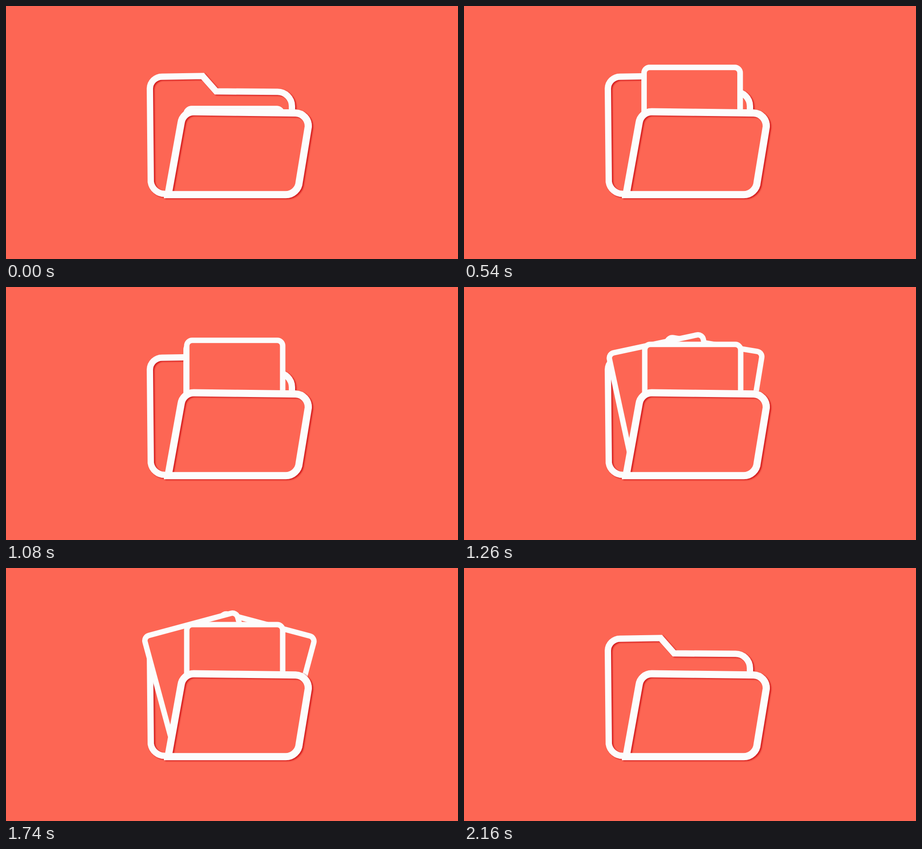
Recreate the animation shown at these times as an HTML page. Size 999x561 px, loop 2400 ms.

```html
<!DOCTYPE html>
<html lang="en">
<head>
<meta charset="utf-8">
<title>Folder</title>
<style>
  html, body { margin: 0; width: 100%; height: 100%; overflow: hidden; background: #fd6654; }
  svg { display: block; width: 100vw; height: 100vh; }
  .line { fill: none; stroke: #fcfcfc; filter: drop-shadow(3px 2.5px 1.5px rgba(205, 15, 20, .85)); }
  .sheet { fill: #fd6654; stroke: #fcfcfc; stroke-width: 12; }
  .back { stroke-width: 14; stroke-miterlimit: 8; }
  .front { stroke-width: 16; }
  .cover { fill: #fd6654; }
</style>
</head>
<body>
<svg viewBox="0 0 999 561">
  <defs>
    <clipPath id="pocket"><rect width="999" height="415"/></clipPath>
    <path id="flap" d="M349 418.3H617A30 30 0 0 0 648 390L668 268A29 29 0 0 0 640 237.2L415 234.5A28 28 0 0 0 387 259L357.9 421"/>
  </defs>
  <path class="line back" d="M352 416.5A31 31 0 0 1 320 390L318 183A27 27 0 0 1 345 156.7L434.5 155.3L464.5 189.3L600 190.3A32 32 0 0 1 632 222V234"/>
  <g clip-path="url(#pocket)">
    <rect class="sheet" id="right" x="-217.5" y="5.5" width="212" height="239" rx="12"/>
    <rect class="sheet" id="left" x="5.5" y="5.5" width="212" height="239" rx="12"/>
    <rect class="sheet" id="middle" x="5.5" y="5.5" width="212" height="239" rx="12"/>
  </g>
  <use class="cover" href="#flap"/>
  <use class="line front" href="#flap"/>
</svg>
<script>
  const LOOP = 2400, STEP = 60;
  const TOP = 120, DROP = 125, EXIT = 280, FOLD = 1810;

  // x, low: pivot corner at rest; dx, dy, angle: how far the sheet fans out; the rest are start times
  const sheets = [
    { id: "left", x: 392.5, low: 222, rise: 345, fan: 1107, drop: 1898, dx: -95, dy: 28.7, angle: -15.1 },
    { id: "right", x: 616, low: 222, rise: 345, fan: 1147, drop: 1870, dx: 74, dy: 30, angle: 15 },
    { id: "middle", x: 394, low: 245, rise: 627, fan: 0, drop: 1846, dx: 0, dy: 0, angle: 0 }
  ];

  // Damped spring from 0 to 1; a lower damping overshoots more
  function spring(ms, damping) {
    const a = Math.max(0, ms) * 0.0095;
    return 1 - Math.exp(-damping * a) * (Math.cos(a) + damping * Math.sin(a));
  }

  function smooth(ms) {
    const p = Math.min(1, Math.max(0, ms / EXIT));
    return p * p * (3 - 2 * p);
  }

  function place(s, time) {
    const fan = spring(time - s.fan, 1.4) * (1 - smooth(time - FOLD));
    const slide = fan * (1.25 - 0.25 * fan);
    const lift = (TOP - s.low) * spring(time - s.rise, 0.66);
    const x = s.x + s.dx * slide;
    const y = s.low + lift + s.dy * slide + DROP * smooth(time - s.drop);
    return `translate(${x} ${y}) rotate(${s.angle * fan})`;
  }

  const start = performance.now();

  function draw() {
    const elapsed = (performance.now() - start) % LOOP;
    const time = Math.floor(elapsed / STEP) * STEP;
    for (const s of sheets) document.getElementById(s.id).setAttribute("transform", place(s, time));
    requestAnimationFrame(draw);
  }
  draw();
</script>
</body>
</html>
```
